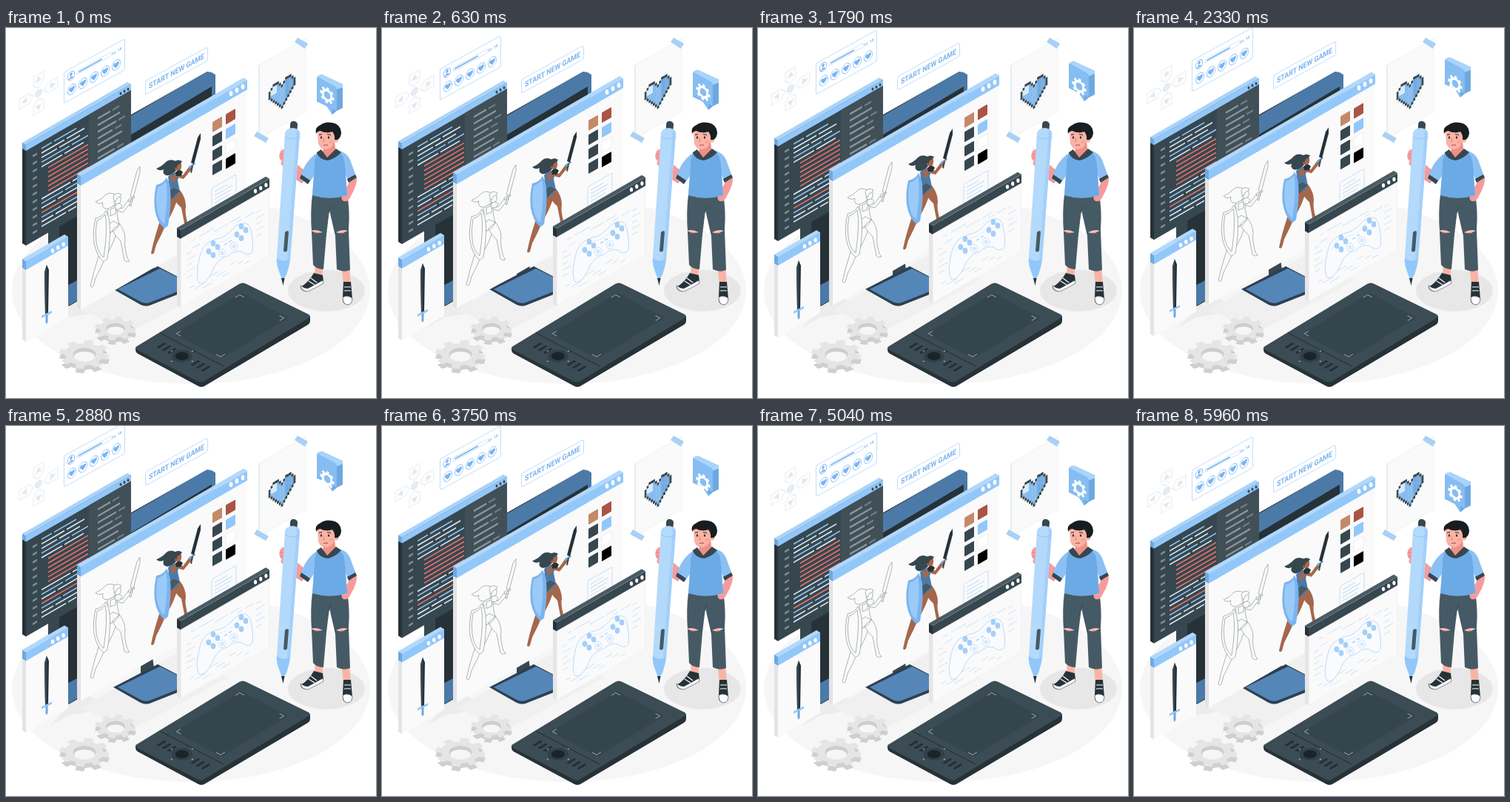
Recreate the animation shown at these times as an HTML page with a canvas. Size 500 px wide and 500 px high, loop 6000 ms.

```html
<!DOCTYPE html>
<html lang="en">
<head>
<meta charset="utf-8">
<title>Game design</title>
<style>
html, body { margin: 0; width: 100%; height: 100%; overflow: hidden; background: #fff; }
canvas { display: block; width: 500px; height: 500px; }
</style>
</head>
<body>
<canvas id="stage" width="500" height="500"></canvas>
<script>
const ctx = document.getElementById('stage').getContext('2d');
const LOOP = 6000, SLOPE = 0.577;
const BLUE = '#92c7fa', SKY = '#7ab4f0', MID = '#6fa8e0', DEEP = '#4c7aa8', PALE = '#c3defa';
const DARK = '#37474f', SLATE = '#455a64', NIGHT = '#263238', FACE = '#fafafa';
const SKIN = '#f9b3a4', PINK = '#f79a9c', BROWN = '#a5674c';

function shape(d, fill, stroke, w = 1) {
  const p = new Path2D(d);
  if (fill) { ctx.fillStyle = fill; ctx.fill(p); }
  if (stroke) { ctx.strokeStyle = stroke; ctx.lineWidth = w; ctx.stroke(p); }
}
const poly = (pts, fill, stroke, w) => shape('M' + pts.map(p => p.join(' ')).join('L') + 'Z', fill, stroke, w);

function oval(x, y, rx, ry, fill, stroke, w = 1) {
  ctx.beginPath();
  ctx.ellipse(x, y, rx, ry, 0, 0, 7);
  if (fill) { ctx.fillStyle = fill; ctx.fill(); }
  if (stroke) { ctx.strokeStyle = stroke; ctx.lineWidth = w; ctx.stroke(); }
}
function box(x, y, w, h, r, fill, stroke, lw = 1) {
  ctx.beginPath();
  ctx.roundRect(x, y, w, h, r);
  if (fill) { ctx.fillStyle = fill; ctx.fill(); }
  if (stroke) { ctx.strokeStyle = stroke; ctx.lineWidth = lw; ctx.stroke(); }
}
function shifted(dy, draw) {
  ctx.save();
  ctx.translate(0, dy);
  draw();
  ctx.restore();
}
// wall plane, by default rising to the right
function wall(x, y, draw, slope = -SLOPE) {
  ctx.save();
  ctx.transform(1, slope, 0, 1, x, y);
  draw();
  ctx.restore();
}
function label(text, x, y, size, color) {
  ctx.save();
  ctx.translate(x, y);
  ctx.scale(0.866, 1);
  ctx.font = `bold ${size}px Roboto, Arial, sans-serif`;
  ctx.textAlign = 'center';
  ctx.textBaseline = 'middle';
  ctx.fillStyle = color;
  ctx.fillText(text, 0, 0);
  ctx.restore();
}
function panel(x, y, w, h, bar, c) {
  const r = y - w * SLOPE;
  poly([[x - 5, y - 3], [x, y], [x, y + h], [x - 5, y + h - 3]], c.side);
  poly([[x - 5, y - 3], [x, y], [x, y + bar], [x - 5, y + bar - 3]], c.barSide);
  poly([[x - 5, y - 3], [x + w - 5, r - 3], [x + w, r], [x, y]], c.top);
  wall(x, y, () => {
    box(0, 0, w, h, 0, c.face);
    box(0, 0, w, bar, 0, c.bar);
  });
}
const dots = (x, y, gap, rx, ry, color) => {
  for (let i = 0; i < 3; i++) oval(x + i * gap, y - i * gap * SLOPE, rx, ry, color);
};
function cog(x, y, r, teeth, sx, sy, fill, hole, turn = 0) {
  const pts = [];
  for (let i = 0; i < teeth; i++) {
    [[-.3, .76], [-.22, 1], [.22, 1], [.3, .76]].forEach(([o, k]) => {
      const a = (i + o) / teeth * Math.PI * 2 + turn;
      pts.push([x + Math.cos(a) * r * k * sx, y + Math.sin(a) * r * k * sy]);
    });
  }
  poly(pts, fill);
  oval(x, y, r * .45 * sx, r * .45 * sy, hole);
}

function floor() {
  oval(250, 355, 242, 126, '#f6f6f6');
  oval(433, 355, 52, 28, '#e7e7e7');
  poly([[60, 405], [84, 391], [150, 380], [101, 360]], '#ececec');
  poly([[101, 381], [236, 304], [300, 340], [170, 410]], '#f0f0f0');
  for (const [x, y, r] of [[148, 406, 28], [106, 441, 34]]) {
    cog(x, y + 6, r, 8, 1, .58, '#cfcfcf', '#cfcfcf', .2);
    cog(x, y, r, 8, 1, .58, '#e5e5e5', '#cdcdcd', .2);
    oval(x, y + 3, r * .41, r * .2, '#f6f6f6');
  }
}

function pad() {
  wall(44, 88, () => {
    for (let i = 0; i < 4; i++) {
      ctx.save();
      ctx.rotate(i * Math.PI / 2);
      shape('M-7 -26H7V-13L0 -7L-7 -13Z', '#fdfdfd', '#e3e8ed', .8);
      shape('M0 -23L4 -16H-4Z', '#dfe7f0');
      ctx.restore();
    }
    oval(0, 0, 4.5, 4.5, '#e6edf5', '#dde6ef');
  });
}

function card() {
  wall(78, 60, () => {
    box(.5, 0, 82, 42, 3, '#fff', PALE, 1);
    oval(10, 10, 4.8, 5.8, '#fff', SKY, .8);
    oval(10, 8, 1.8, 2.2, SKY);
    shape('M6.5 14Q10 8 13.5 14Z', SKY);
    box(18, 8, 47, 5, 2.5, '#fff', PALE, .8);
    box(20, 9.5, 32, 2, 1, SKY);
    label('Lv. 19', 72, 11, 5.5, SKY);
    for (let i = 0; i < 5; i++) {
      const x = 11 + i * 15;
      oval(x, 29, 5.6, 6.6, '#fff', BLUE, .9);
      shape(`M${x} 33Q${x - 7} 27 ${x - 2} 25.5Q${x} 25.5 ${x} 27.5Q${x} 25.5 ${x + 2} 25.5Q${x + 7} 27 ${x} 33Z`, SKY);
    }
  }, -.55);
}

function start() {
  wall(188, 72, () => {
    box(.5, 0, 84, 18.5, 3, '#fff', PALE, 1);
    label('START NEW GAME', 42.5, 10, 10.2, SKY);
  }, -.55);
}

function monitor() {
  poly([[57, 180], [272, 59], [283, 64], [283, 220], [97, 369], [85, 376], [57, 362]], DARK);
  shape('M57 184L268 61Q273 58 278 60L283 63V220L70 200Z', DEEP);
  poly([[72, 202], [278, 79], [278, 220], [97, 366], [72, 360]], NIGHT);
  poly([[83, 348], [98, 340], [98, 367], [83, 376]], DEEP);
  poly([[182, 336], [182, 305], [197, 305], [201, 334]], DARK);
  shape('M145 353L205 322L232 336V360L194 375Q188 377 182 374Z', '#2d4052');
  shape('M151 353L208 325L232 337V356L194 371Q188 373 182 370Z', '#5586b8');
}

function codeWindow() {
  panel(27, 158, 142, 136, 8, { side: NIGHT, barSide: MID, top: '#a9d3fb', bar: BLUE, face: DARK });
  wall(27, 158, () => {
    box(85, 8, 57, 128, 0, '#414f57');
    for (let i = 0; i < 11; i++) box(9, 19 + i * 10.4, 6, 3, .5, '#7d8a91');
    for (let i = 0; i < 18; i++) {
      const v = 16 + i * 6.2, block = i > 4 && i < 11;
      if (block || i === 14) {
        box(block ? 30 : 21, v, 54, 1.9, 0, '#e2716a');
        continue;
      }
      const cut = 35 + (i * 17) % 27, end = 68 + (i * 11) % 17;
      const color = i % 3 ? '#dce9f3' : BLUE;
      box(21, v, cut - 21, 1.8, 0, color);
      if (cut + 3 < end) box(cut + 3, v, end - cut - 3, 1.8, 0, color);
    }
    for (let i = 0; i < 11; i++) {
      const w = 17 + (i * 13) % 18;
      box(97, 19 + i * 9, w, 2.6, 0, '#8b979d');
      if (w < 26) box(100 + w, 19 + i * 9, 9, 2.6, 0, '#707d84');
    }
  });
  dots(155, 88.5, 5, 1.5, 2, DARK);
}

const hero = [
  ['M230 180Q221 176 216 181Q212 186 203 190Q208 194 213 191Q211 197 216 199Q224 201 231 191Z', DARK],
  ['M222 222L233 226Q228 246 217 263Q211 278 203 293L200 304Q197 307 196 304Q200 285 207 264Q214 245 217 226Z', BROWN],
  ['M226 222L235 219Q243 229 243 241Q241 248 246 266L249 270Q245 272 242 269L237 243Q231 238 226 229Z', BROWN],
  ['M222 198L231 194Q235 197 232 206L235 221Q230 230 222 231L218 222Q221 210 219 201Z', DEEP],
  ['M223 200L231 197L230 206L223 209Z', BROWN],
  ['M218 222L227 216L235 220L229 225L223 232Z', SLATE],
  ['M230 194L239 199L247 188L251 186L253 189L249 193L240 204L232 202Z', BROWN],
  ['M229 182Q235 178 237 184Q238 191 233 194L228 191Z', BROWN],
  ['M227 182Q231 176 238 180Q236 184 232 185L230 190Q227 188 227 182Z', DARK],
  ['M229 195Q235 189 239 195L236 200L230 200Z', NIGHT],
  ['M247 187L255 182L256 184L248 190Z', MID],
  ['M250 182L259 148L263 142L263 150L254 184Z', NIGHT],
  ['M249 195L251 186L253 185L251 196Z', DARK],
  ['M203 212Q213 210 217 202Q221 209 222 218Q224 238 219 267L214 271Q204 263 201 245Q199 230 203 212Z', SKY],
  ['M205 215Q212 213 216 207Q220 225 214 265Q206 259 204 244Q202 230 205 215Z', '#9acaf8']
];

function mainWindow() {
  panel(101, 200, 225, 181, 13, { side: '#e4e4e4', barSide: MID, top: '#b1d8fc', bar: BLUE, face: FACE });
  dots(304, 88.5, 8, 2.4, 3.5, '#fff');
  hero.forEach(([d, c]) => shape(d, c));
  ctx.save();
  ctx.translate(-82, 45);
  hero.forEach(([d]) => shape(d, FACE, '#6d7a81', .55));
  ctx.restore();
  ['#c48a68', DARK, DARK, DARK].forEach((c, i) =>
    wall(279, 127 + i * 19.4, () => box(0, 0, 13, 14, 1, c)));
  ['#a95445', BLUE, '#fff', '#000'].forEach((c, i) =>
    wall(297, 116.5 + i * 20, () => box(0, 0, 13, 14, 1, c, i === 2 ? '#eee' : null)));
  wall(278, 217, () => {
    box(0, 0, 33, 40, 2, FACE, PALE);
    for (let i = 0; i < 5; i++) box(4, 6 + i * 5, 17 + (i * 7) % 9, 1.2, 0, PALE);
  });
}

function swordWindow() {
  panel(27, 315, 57, 109, 12, { side: '#e4e4e4', barSide: MID, top: '#b1d8fc', bar: BLUE, face: FACE });
  dots(63, 301, 7.3, 2.2, 3, '#fff');
  shape('M55 320L58 327L57 386L53 388L52 330Z', NIGHT);
  shape('M55 320L55 387L53 388L52 330Z', DARK);
  shape('M48 389L62 382V385L48 392Z', BLUE);
  shape('M53.5 389L56.5 387V397L55 400L53.5 398Z', MID);
}

function padWindow() {
  panel(236, 273, 120, 105, 12, { side: '#e6e6e6', barSide: NIGHT, top: '#4b5b64', bar: DARK, face: FACE });
  wall(236, 273, () => box(.5, 12, 119, 92.5, 0, null, '#efefef', .8));
  dots(337, 220.5, 7.2, 2.1, 2.9, '#fff');
  wall(236, 273, () => {
    for (let i = 0; i < 9; i++) {
      const w = 6 + (i * 5) % 9;
      box(14 + (i * 31) % 82, 23 + (i % 3) * 5, w, .9, 0, PALE);
      box(12 + (i * 37) % 84, 85 + (i % 3) * 5, w, .9, 0, PALE);
      if (i < 5) {
        box(8, 37 + i * 8, w, .9, 0, PALE);
        box(102, 35 + i * 8, w, .9, 0, PALE);
      }
    }
  });
  const line = '#b5d7f9';
  shape('M262 308Q266 290 285 285Q297 284 310 268Q325 258 330 270Q335 290 333 302Q328 310 318 302Q308 300 300 308Q285 312 279 328Q270 348 261 345Q255 335 262 308Z', '#f9fbfe', line, .9);
  shape('M267 308Q272 293 286 290Q302 288 312 274Q324 264 327 277', null, '#dcebfa', .8);
  for (const [x, y] of [[280, 299], [318, 276]]) {
    for (const [a, b] of [[0, -8], [-6, 3], [6, -3], [0, 8]]) oval(x + a, y + b, 3, 3.7, '#a5d0fa', '#8bbdec', .5);
  }
  for (const [x, y] of [[292, 304], [308, 295]]) {
    oval(x, y, 4.6, 5.3, '#fff', line, .8);
    oval(x, y, 2.5, 2.9, '#d6e8fa');
  }
  shape('M295 293L299 291M301 289L305 287', null, '#a5d0fa', 1.3);
}

function tablet() {
  const at = (a, b) => [175 + 145 * a + 88 * b, 432 - 89 * a + 46 * b];
  shape('M175 432L264 478L411 390V396Q411 399 408 401L268 484Q264 486 260 484L178 440Q175 438 175 435Z', NIGHT);
  shape('M177 430L315 346Q320 343 325 346L409 387Q413 390 409 392L268 477Q263 480 258 477L177 435Q173 432 177 430Z', '#3b4c54');
  poly([at(.22, 0), at(.23, 0), at(.23, .99), at(.22, .99)], '#2c3a42');
  poly([at(.28, .14), at(.9, .14), at(.9, .86), at(.28, .86)], '#35454d');
  for (const a of [.29, .88]) for (const b of [.15, .83]) {
    const da = a < .5 ? .04 : -.04, db = b < .5 ? .07 : -.07;
    const [p, q, r] = [at(a + da, b), at(a, b), at(a, b + db)];
    shape(`M${p}L${q}L${r}`, null, '#a9b8c0', .9);
  }
  for (const b of [.16, .24, .32, .68, .76, .84]) {
    poly([at(.09, b), at(.17, b), at(.17, b + .05), at(.09, b + .05)], NIGHT, '#52626b', .5);
  }
  const [x, y] = at(.13, .5);
  oval(x, y, 14, 8.5, '#313f47');
  oval(x, y, 9, 5.5, '#1a2429');
  for (const [a, b] of [[-14, -7], [14, 7], [14, -7], [-14, 7]]) oval(x + a, y + b, 1.1, .8, BLUE);
}

function poster() {
  wall(341, 51, () => box(0, 0, 64, 99, 0, '#fafafa', '#f0f0f0', .8));
  poly([[341, 51], [343, 50], [343, 149], [341, 150]], '#e3eefa');
  poly([[394, 13], [408, 21], [404, 28], [390, 19]], '#a9d0f6');
  poly([[339, 140], [355, 149], [351, 155], [335, 146]], '#a9d0f6');
  const inside = (i, j) => {
    const k = Math.abs(i);
    return k < 7 && j >= Math.max(0, Math.abs(k - 3) - 1) && j <= 10 - k;
  };
  wall(373, 71, () => {
    for (let i = -6; i < 7; i++) for (let j = 0; j < 11; j++) {
      if (!inside(i, j)) continue;
      const edge = !inside(i - 1, j) || !inside(i + 1, j) || !inside(i, j - 1) || !inside(i, j + 1);
      const glow = i < -2 && j < 4;
      box(i * 2.8 - 1.4, j * 3.6 - 1.8, 2.9, 3.7, 0, edge ? DARK : glow ? '#d5e9fc' : i > 1 ? MID : '#82b9ee');
    }
  });
}

function bubble() {
  shape('M420 68Q420 65 423 64L427 63L455 76V108L447 112L441 117L434 106L420 99Z', MID);
  shape('M420 68Q420 65 423 64L427 63L453 75Q456 77 455 80L447 83Z', '#a9d4fb');
  shape('M420 68Q420 66 423 67L445 79Q447 80 447 83V110Q447 112 445 111L441 109V117L433 105L422 99Q420 98 420 96Z', '#86bdf3');
}
const bubbleGear = () => wall(434, 91, () => cog(0, 0, 11, 8, .88, 1, '#fff', '#86bdf3', .1), .5);

function shoes() {
  shape('M417 318L429 320L427 338L418 336Z', SKIN);
  shape('M453 320L464 322L466 346L456 346Z', SKIN);
  shape('M416 331L428 334L429 342Q425 347 417 350L406 356Q398 355 398 350Q409 344 416 331Z', NIGHT);
  shape('M398 348Q403 352 408 352L428 341L429 345Q421 350 408 356Q399 356 398 348Z', '#fff', DARK, .6);
  shape('M409 342L417 347M412 338L420 344', null, '#fff', 1.2);
  shape('M456 343L466 343L468 366Q467 374 461 374Q454 373 455 364Z', NIGHT);
  shape('M455 364Q461 360 468 365Q468 374 461 374Q455 373 455 364Z', '#fff', DARK, .6);
  shape('M457 350H466M457 355H466', null, '#fff', 1.2);
}

function head() {
  shape('M428 157L444 153L446 171Q437 180 429 171Z', '#f08f86');
  shape('M420 168L426 164L434 175L446 163L453 168Q446 176 435 179Q424 178 420 169Z', DARK);
  shape('M428 166L434 174L444 164L443 157Z', '#f08f86');
  shape('M421 141Q421 132 434 133Q446 135 445 149Q443 161 434 164Q425 165 422 156Z', SKIN);
  oval(446, 150, 3.5, 4.6, SKIN);
  shape('M419 143Q417 134 425 131Q431 126 441 128Q452 130 453 141Q453 148 448 151L444 151Q445 145 441 140Q432 143 425 139Q421 139 419 143Z', '#171d21');
  oval(426, 148, 1.2, 1.7, NIGHT);
  oval(436, 148, 1.2, 1.7, NIGHT);
  shape('M423 144.5L427 143.5M434 143.5L439 144.5', null, NIGHT, 1.1);
  shape('M430 149L428.5 153.5L431 154', null, '#e28378', .9);
  shape('M429 158.5Q433 157.5 435 158.5', null, '#a94a45', 1.1);
  oval(439, 154, 2.6, 1.9, '#fba194');
}

function man() {
  shoes();
  shape('M414 225L461 225Q465 247 463 272L465 327Q456 331 447 326L445 281L437 246L433 279L429 326Q420 326 415 320L413 275Q411 248 414 225Z', SLATE);
  shape('M439 240L436 250', null, DARK, 1);
  shape('M413 274Q420 271 427 276Q418 279 413 274ZM447 276Q454 271 461 274Q454 280 447 276Z', PINK);
  shape('M413 274Q420 274 427 276M447 276Q454 275 461 274', null, '#fff', .7);
  // arm on hip
  shape('M464 197L474 202Q475 212 466 227Q462 236 456 234Q451 230 455 222Q460 217 463 210Z', PINK);
  // arm to the pen
  shape('M400 210Q386 203 371 183L379 169Q390 184 409 196Z', PINK);
  oval(375.5, 172.5, 6.2, 8.5, PINK);
  shape('M370 171H376M370 176H376', null, '#e4817f', .7);
  shape('M422 168L447 165Q461 168 465 178L473 200L462 207L459 198L461 226Q438 233 414 226L416 200L409 210L397 204Q404 178 422 168Z', '#8bc0f4');
  shape('M422 168L447 165Q457 170 458 185L461 226Q438 233 414 226L417 186Q417 173 422 168Z', '#6caae6');
  shape('M397 203L399 198L411 206L408 211Z', DARK);
  shape('M461 204L472 198L474 202L463 209Z', DARK);
  head();
}

function pen() {
  shape('M384 130Q385 125 390 126Q394 127 394 131L393 141H384Z', DARK);
  shape('M377 142Q379 135 388 135Q397 136 397 143L384 313Q383 322 379 333L374 342L368 326Q365 317 366 310Z', '#b3d9fb');
  shape('M393 137Q397 139 397 143L384 313L380 314Z', '#a3cffa');
  shape('M377 147Q387 153 397 147', null, BLUE, 1);
  shape('M366 311Q375 318 384 312Q383 322 379 333L374 342L368 326Q365 317 366 311Z', BLUE);
  shape('M372 338L376.5 338L374.5 348Z', NIGHT);
  shape('M377 276Q379 273 382 275L380 301Q377 304 375 301Z', SLATE);
}

function draw(t) {
  const rise = 10 * (Math.abs(t / (LOOP / 2) - 1) - 1);
  ctx.fillStyle = '#fff';
  ctx.fillRect(0, 0, 500, 500);
  floor();
  shifted(rise, pad);
  shifted(rise * 2, card);
  shifted(rise, start);
  monitor();
  shifted(rise, () => {
    codeWindow();
    mainWindow();
    swordWindow();
    padWindow();
  });
  tablet();
  poster();
  shifted(rise * 3, bubble);
  shifted(rise * 2, bubbleGear);
  man();
  pen();
}

const begin = performance.now();
function frame(now) {
  draw(Math.max(0, now - begin) % LOOP);
  requestAnimationFrame(frame);
}
draw(0);
requestAnimationFrame(frame);
</script>
</body>
</html>
```
